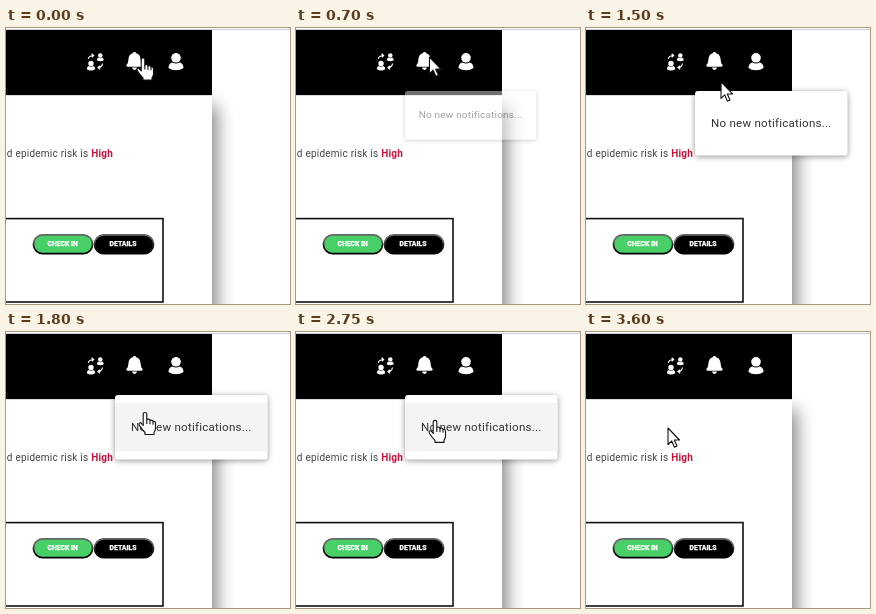
Write an HTML page that moves like this. It is 284x276 px and loops after 3650 ms.

```html
<!DOCTYPE html>
<html lang="en">
<head>
<meta charset="utf-8">
<title>Notification menu</title>
<style>
  html, body { margin: 0; width: 100%; height: 100%; overflow: hidden; background: #fff; }
  svg { display: block; width: 284px; height: 276px; }
  text { font-family: Roboto, "Noto Sans", sans-serif; }
  .body { font-size: 10px; letter-spacing: .23px; fill: #444; }
  .label { font-size: 6.8px; font-weight: 900; fill: #fff; stroke: #fff; stroke-width: .25; text-anchor: middle; }
  .item { font-size: 11.6px; letter-spacing: .22px; fill: #333; }
  .paper { filter: drop-shadow(0 1px 3px rgba(0,0,0,.3)) drop-shadow(0 1px 2px rgba(0,0,0,.14)); }
</style>
</head>
<body>
<svg viewBox="0 0 284 276">
  <defs>
    <filter id="blur" x="-50%" y="-50%" width="200%" height="200%"><feGaussianBlur stdDeviation="9"/></filter>
    <clipPath id="outside"><rect x="206" y="2" width="78" height="274"/></clipPath>
    <linearGradient id="bevel" x2="0" y2="1">
      <stop offset=".25" stop-color="#666"/><stop offset=".75" stop-color="#000"/>
    </linearGradient>
    <g id="person">
      <circle cy="4.8" r="4.8"/>
      <path d="M-7.5 15Q-7.5 10.5-3.8 9.4Q0 11.6 3.8 9.4Q7.5 10.5 7.5 15Q4.5 17.3 0 17.3Q-4.5 17.3-7.5 15Z"/>
    </g>
  </defs>

  <rect width="284" height="276" fill="#fff"/>
  <rect y="1" width="284" height="1" fill="#d0d0d0"/>
  <g clip-path="url(#outside)">
    <rect x="100" y="78" width="111" height="240" fill="#000" opacity=".48" filter="url(#blur)"/>
  </g>
  <rect y="2" width="206" height="65" fill="#000"/>
  <rect y="67" width="206" height="1" fill="#ddd"/>

  <g fill="#fff">
    <use href="#person" transform="translate(85 32.8) scale(.56)"/>
    <use href="#person" transform="translate(94.3 25.3) scale(.46)"/>
    <g fill="none" stroke="#fff" stroke-width="1.2">
      <path d="M82.3 31Q82.7 27.8 87 27.5M85.6 25.8L87.6 27.5L85.7 29.3"/>
      <path d="M96.5 35.5Q96 39.3 92.5 39.6M94.2 37.8L92 39.6L94.2 41.3"/>
    </g>
    <path d="M128.5 24Q130 24 130.2 25.3Q134.3 26.5 134.5 31Q134.6 35 136.7 37.3Q136.8 38.6 135.5 38.7H121.5Q120.2 38.6 120.3 37.3Q122.4 35 122.5 31Q122.7 26.5 126.8 25.3Q127 24 128.5 24ZM126 39.6H131Q130.7 42 128.5 42Q126.3 42 126 39.6Z"/>
    <use href="#person" x="170" y="25"/>
  </g>

  <text class="body" x=".8" y="129.3" xml:space="preserve">d epidemic risk is</text>
  <text class="body" x="85.2" y="129.3" style="font-weight:700;fill:#c8143c">High</text>

  <rect x="-5" y="190.6" width="162" height="83.4" fill="#fff" stroke="#111" stroke-width="1.6"/>
  <g stroke="url(#bevel)" stroke-width="1.7">
    <rect x="27.4" y="206.8" width="59.2" height="18.8" rx="9.4" fill="#49cf67"/>
    <rect x="88.4" y="206.8" width="59.2" height="18.8" rx="9.4" fill="#000"/>
  </g>
  <text class="label" x="56.7" y="218.3">CHECK IN</text>
  <text class="label" x="117" y="218.3">DETAILS</text>

  <g id="menu">
    <rect class="paper" x="109" y="63" width="152.5" height="64.5" rx="3" fill="#fff"/>
    <rect id="hover" x="109" y="71" width="152.5" height="48.5" fill="#f4f4f4"/>
    <text class="item" x="125" y="99">No new notifications...</text>
  </g>

  <g id="cursor" fill="#fff" stroke="#111" stroke-width="1.1" stroke-linejoin="round">
    <path id="arrow" d="M0 0V16.5L3.7 13L6.4 19.2L9 18L6.3 12H11.5Z"/>
    <g id="hand">
      <path d="M-1.8 13V1.6Q-1.8 0 0 0Q1.8 0 1.8 1.6V7Q4.5 5.9 5 8Q7.5 7 8 9Q10.5 8.4 10.5 11V16Q10.3 18 9 20V22H0V20Q-3 17-5.8 12.6Q-6.4 10-4 10.4Z"/>
      <path fill="none" d="M1.8 7V11.5M5 8V11.8M8 9V12.3"/>
    </g>
  </g>
</svg>
<script>
const LOOP = 3650;
const OPEN = 640, CLOSE = 3200, FADE = 240;
// Cursor stops: time, x, y
const stops = [
  [0, 137, 30], [600, 137, 30], [780, 131, 28.6], [1250, 131, 28.6],
  [1750, 139, 79], [1800, 139, 80.5], [2050, 139, 88.4],
  [2750, 139, 88.4], [3000, 82, 96], [LOOP, 82, 96]
];
const el = id => document.getElementById(id);
const clamp = v => Math.max(0, Math.min(1, v));
const smooth = v => v * v * (3 - 2 * v);
const show = (id, on) => el(id).setAttribute("visibility", on ? "visible" : "hidden");

function cursorAt(t) {
  const i = stops.findIndex(s => s[0] > t);
  const [t0, x0, y0] = stops[i - 1], [t1, x1, y1] = stops[i];
  const k = smooth((t - t0) / (t1 - t0));
  return [x0 + (x1 - x0) * k, y0 + (y1 - y0) * k];
}

function draw(t) {
  const [x, y] = cursorAt(t);
  const open = t >= OPEN && t < CLOSE + FADE;
  const onItem = t > 1250 && t < CLOSE && x >= 109 && y >= 71;
  const pointing = t < OPEN || onItem;

  const closing = t > CLOSE;
  const grow = closing ? 1 - smooth(clamp((t - CLOSE) / FADE))
                       : 1 - (1 - clamp((t - OPEN) / FADE)) ** 2;
  const sx = .75 + .25 * grow, sy = .5625 + .4375 * grow;
  el("menu").setAttribute("transform", `translate(109 63) scale(${sx} ${sy}) translate(-109 -63)`);
  el("menu").setAttribute("opacity", open ? grow : 0);
  show("hover", onItem);
  show("hand", pointing);
  show("arrow", !pointing);
  el("cursor").setAttribute("transform", `translate(${x} ${y})`);
}

const start = performance.now();
function tick() {
  draw((performance.now() - start) % LOOP);
  requestAnimationFrame(tick);
}
tick();
</script>
</body>
</html>
```
